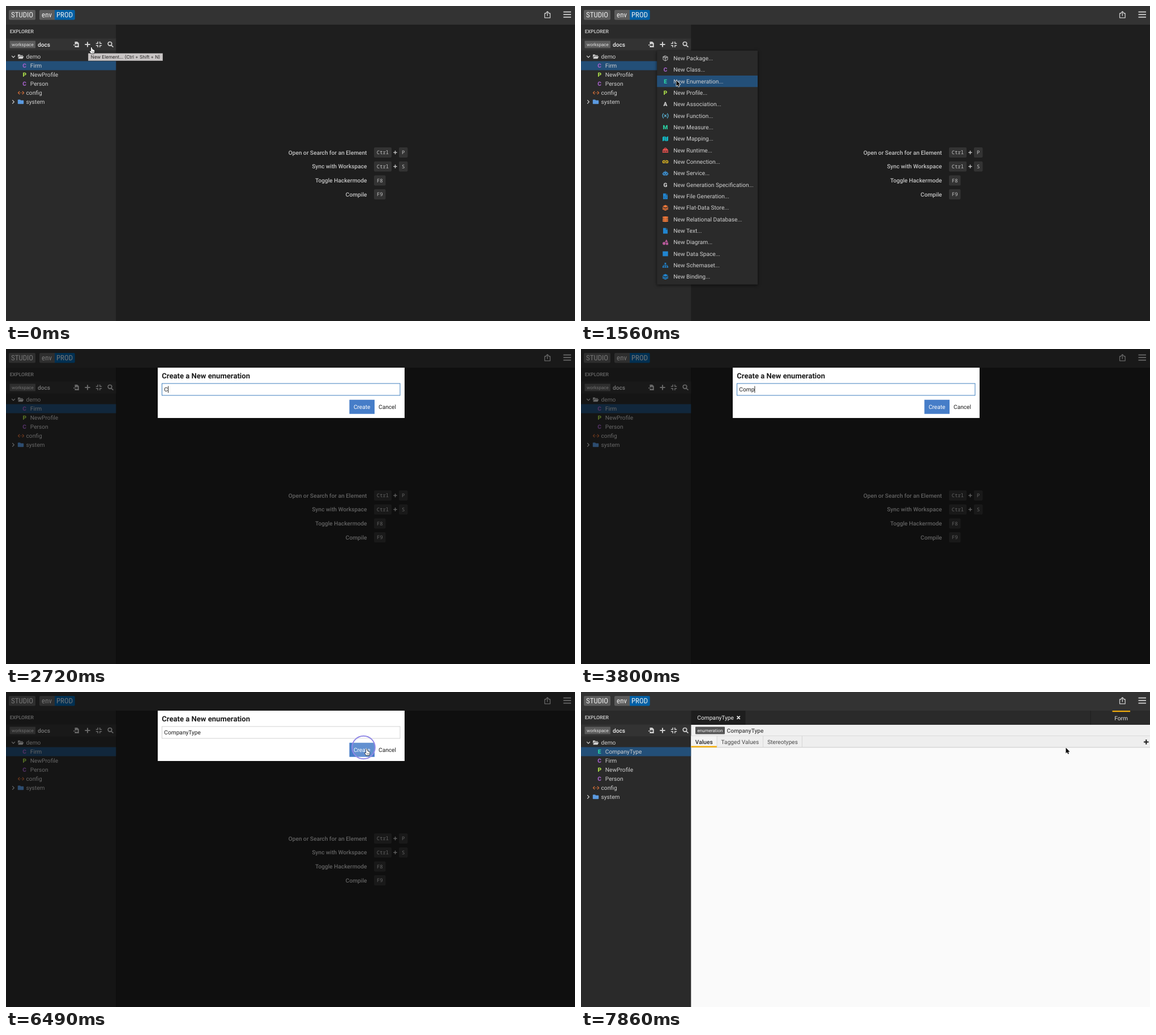
An HTML page with a canvas that plays this animation: 1005 px wide and 557 px high, repeating every 8 s.

```html
<!DOCTYPE html>
<html lang="en">
<head>
<meta charset="utf-8">
<title>Model studio</title>
<style>
html, body { margin: 0; width: 100%; height: 100%; overflow: hidden; background: #1e1e1e; }
canvas { display: block; width: 1005px; height: 557px; }
</style>
</head>
<body>
<canvas id="stage" width="1005" height="557"></canvas>
<script>
const ctx = document.getElementById('stage').getContext('2d');
const LOOP = 8000, STEP = 80;
const SANS = 'Roboto, sans-serif', MONO = '"Roboto Mono", "Noto Sans Mono", monospace';
const BODY = 10.18, SMALL = 8, TITLE = 13.08;
const SIDE = 194.5;
const PURPLE = '#a05fc4', TEAL = '#2bd0a3', LIME = '#aadc4a', RED = '#e8504e', BLUE = '#2185d0';
const ORANGE = '#f0793a', PALE = '#cfcfcf', SELECT = '#234f78', AMBER = '#f3ae0b';

// ---- drawing helpers ----
function rect(x, y, w, h, color, r = 0) {
  ctx.fillStyle = color;
  ctx.beginPath();
  ctx.roundRect(x, y, w, h, r);
  ctx.fill();
}

function circle(x, y, r, color) {
  ctx.fillStyle = color;
  ctx.beginPath();
  ctx.arc(x, y, r, 0, Math.PI * 2);
  ctx.fill();
}

// y is the middle of the capital letters
function text(str, x, y, color, { size = BODY, weight = 400, align = 'left', font = SANS, stretch = 'normal' } = {}) {
  ctx.font = `${weight} ${size}px ${font}`;
  ctx.fontStretch = stretch;
  ctx.textRendering = 'geometricPrecision';
  ctx.textAlign = align;
  ctx.fillStyle = color;
  ctx.fillText(str, x, y + size * 0.356);
}

// SVG path placed at x, y
function shape(d, x, y, { fill, stroke, width = 1.2, scale = 1 }) {
  const path = new Path2D(d);
  ctx.save();
  ctx.translate(x, y);
  ctx.scale(scale, scale);
  ctx.lineJoin = ctx.lineCap = 'round';
  if (stroke) { ctx.strokeStyle = stroke; ctx.lineWidth = width; ctx.stroke(path); }
  if (fill) { ctx.fillStyle = fill; ctx.fill(path); }
  ctx.restore();
}

function plus(x, y, r, w, color) {
  rect(x - r, y - w / 2, 2 * r, w, color);
  rect(x - w / 2, y - r, w, 2 * r, color);
}

// ---- icons, centred on x, y ----
const letter = (ch, color) => (x, y) => text(ch, x, y, color, { weight: 900, align: 'center' });
const line = (d, color, width) => (x, y) => shape(d, x, y, { stroke: color, width });
const solid = (d, color) => (x, y) => shape(d, x, y, { fill: color });
const layers = color => (x, y) => {
  shape('M0-5L5-2.6L0-.2L-5-2.6Z', x, y, { fill: color });
  for (const dy of [0, 2.4]) shape('M-4.6-.2L0 2L4.6-.2', x, y + dy, { stroke: color, width: 1.4 });
};
const file = solid('M-4-5H1V-2H4V5H-4ZM1.8-5L4-2.8H1.8Z', BLUE);
const cube = line('M0-4.4L4-2.3V2.3L0 4.4L-4 2.3V-2.3ZM-4-2.3L0-.2L4-2.3M0-.2V4.4M-2-3.3L2-1.2', PALE, 0.9);

const icons = {
  C: letter('C', PURPLE), E: letter('E', TEAL), P: letter('P', LIME),
  A: letter('A', PALE), M: letter('M', TEAL), G: letter('G', PALE),
  fx: line('M-3.5-4Q-6.5 0-3.5 4M3.5-4Q6.5 0 3.5 4M-1.7-1.8L1.7 1.8M1.7-1.8L-1.7 1.8', '#5bb8dc', 1.2),
  map: solid('M-5-3L-2-4.5V3.2L-5 4.5ZM-1.5-4.5L1.5-3V4.5L-1.5 3.2ZM2-3L5-4.5V3.2L2 4.5Z', '#14b4c0'),
  runtime(x, y) {
    line('M-2-2Q-2-4 0-4T2-2', RED, 1.2)(x, y);
    solid('M-3.5-2.4H3.5L5.2 0V.8H-5.2V0ZM-5.2 1.6H-3V2.4H-1.4V1.6H1.4V2.4H3V1.6H5.2V4.2H-5.2Z', RED)(x, y);
  },
  link: line('M-1-2H-2.6A2 2 0 0 0-2.6 2H-1M1-2H2.6A2 2 0 0 1 2.6 2H1M-2 0H2', '#f0c420', 1.3),
  robot(x, y) {
    rect(x - 3.7, y - 2.5, 7.4, 6.5, '#3f97dc', 1.2);
    rect(x - 5.2, y - 0.6, 1, 3, '#3f97dc');
    rect(x + 4.2, y - 0.6, 1, 3, '#3f97dc');
    rect(x - 0.5, y - 4.5, 1, 2, '#3f97dc');
    for (const dx of [-1.7, 1.7]) circle(x + dx, y + 0.2, 0.9, '#2a2a2a');
    rect(x - 2, y + 2.2, 4, 0.8, '#2a2a2a');
  },
  code(x, y) {
    file(x, y);
    line('M-1.2 0L-2.5 1.4L-1.2 2.8M1.2 0L2.5 1.4L1.2 2.8', '#23435c', 0.8)(x, y);
  },
  flat: layers(ORANGE),
  db(x, y) {
    for (const dy of [-3.2, 0, 3.2]) shape('M-5-1.2Q0-2.4 5-1.2V.6Q0 2.2-5 .6Z', x, y + dy, { fill: ORANGE });
  },
  file,
  diagram(x, y) {
    solid('M1.8-5L4.6-.4H-1Z', '#b95a9c')(x, y);
    circle(x - 2.3, y + 2, 2.6, '#b95a9c');
    rect(x + 1, y + 0.6, 4, 4, '#b95a9c');
  },
  square(x, y) { rect(x - 4.7, y - 4.3, 9.4, 8.6, BLUE); },
  tree(x, y) {
    line('M0-3V0M-3.7 2.5V0H3.7V2.5M0 0V2.5', BLUE, 0.9)(x, y);
    for (const [dx, dy] of [[0, -3.2], [-3.7, 3], [0, 3], [3.7, 3]]) rect(x + dx - 1.4, y + dy - 1.2, 2.8, 2.4, BLUE);
  },
  bind: layers(BLUE),
  cube,
  config(x, y) {
    line('M-2.6-2.4L-5 0L-2.6 2.4M2.6-2.4L5 0L2.6 2.4', '#e0743a', 1.2)(x, y);
    for (const dx of [-1.6, 0, 1.6]) circle(x + dx, y, 0.55, '#e0743a');
  },
  open: solid('M-5-3.8H-1.5L-.4-2.6H3.8V-1.2H-3.2L-5 2.6ZM-2.7-.4H5.4L3.4 3.8H-4.7Z', PALE),
  folder: solid('M-4.4-4H-1L.2-2.8H4.4Q5.2-2.8 5.2-2V3Q5.2 3.8 4.4 3.8H-4.4Q-5.2 3.8-5.2 3V-3.2Q-5.2-4-4.4-4Z', '#5b9ae0')
};

// ---- application ----
function topBar() {
  rect(0, 0, 1005, 33, '#333');
  const label = { size: 12.92, font: '"Roboto Condensed", Roboto, sans-serif', stretch: 'condensed', align: 'center' };
  rect(5, 7, 47, 17.5, '#5c5c5c', 2);
  text('STUDIO', 28.5, 15.8, '#f0f0f0', label);
  rect(59, 7, 27.5, 17.5, '#5c5c5c', [2, 0, 0, 2]);
  text('env', 72, 15.8, '#f0f0f0', label);
  rect(86, 7, 35.7, 17.5, '#0060a6', [0, 2, 2, 0]);
  text('PROD', 103.5, 15.8, '#f0f0f0', label);
  shape('M-2.6-2H-4.8V5.8H4.8V-2H2.6M0 2.3V-5.2M-2.5-2.9L0-5.4L2.5-2.9', 956.3, 15, { stroke: PALE, width: 1.3 });
  for (const y of [9.6, 14.2, 18.8]) rect(984.5, y, 13.5, 1.8, PALE);
}

function sidebar(created) {
  rect(0, 33, SIDE, 524, '#2a2a2a');
  text('EXPLORER', 6.7, 45, '#d2d2d2', { size: 8.7, weight: 500 });
  rect(0, 57.5, SIDE, 21, '#333');
  rect(6.5, 61.5, 45.5, 13, '#5c5c5c', 1);
  text('workspace', 29.3, 68, '#dedede', { size: SMALL, align: 'center' });
  text('docs', 55.9, 68, '#f0f0f0', { weight: 500 });

  shape('M-2.5-5H2L4.8-2.2V5H-2.5V2H.6V3.6L3.4 1L.6-1.8V-.1H-2.5ZM-5 .2H-2.5V1.7H-5Z', 124, 68, { fill: PALE });
  plus(144, 68, 4.6, 2, PALE);
  shape('M-4.6-1.8H-1.8V-4.6M4.6-1.8H1.8V-4.6M-4.6 1.8H-1.8V4.6M4.6 1.8H1.8V4.6', 164, 68, { stroke: PALE, width: 1.5 });
  shape('M2.3-1A3.3 3.3 0 1 1-4.3-1A3.3 3.3 0 1 1 2.3-1M1.5 1.7L4.4 4.4', 184.5, 67.8, { stroke: PALE, width: 1.7 });

  rect(0, 97.5, SIDE, 16, SELECT);
  const items = [['C', 'Firm'], ['P', 'NewProfile'], ['C', 'Person']];
  if (created) items.unshift(['E', 'CompanyType']);
  const arrow = { stroke: PALE, width: 1.2 };
  shape('M-2.6-1.3L0 1.3L2.6-1.3', 13, 89.7, arrow);
  icons.open(26, 89.5);
  text('demo', 35.5, 89.5, PALE);
  let y = 105.5;
  for (const [kind, name] of items) {
    icons[kind](32.7, y);
    text(name, 42.8, y, PALE);
    y += 16;
  }
  icons.config(26.5, y);
  text('config', 35.5, y, PALE);
  y += 16;
  shape('M-1.3-2.8L1.5 0L-1.3 2.8', 12.8, y, arrow);
  icons.folder(26, y);
  text('system', 35.5, y, PALE);
}

function shortcuts() {
  rect(SIDE, 33, 1005 - SIDE, 524, '#1e1e1e');
  const rows = [['Open or Search for an Element', 'Ctrl', 'P'], ['Sync with Workspace', 'Ctrl', 'S'],
    ['Toggle Hackermode', 'F8'], ['Compile', 'F9']];
  const key = (str, x, y, w) => {
    rect(x, y - 9, w, 18, '#333', 2);
    text(str, x + w / 2, y, '#c4c4c4', { size: 8.9, align: 'center', font: MONO });
  };
  rows.forEach(([name, first, second], i) => {
    const y = 259 + i * 24.7;
    text(name, 637.5, y, '#c4c4c4', { weight: 500, align: 'right' });
    key(first, 650, y, second ? 31 : 20.5);
    if (!second) return;
    plus(687.5, y, 3.2, 1.4, '#c4c4c4');
    key(second, 694, y, 15.5);
  });
}

function editor() {
  const width = 1005 - SIDE;
  rect(SIDE, 33, width, 25, '#2a2a2a');
  rect(SIDE, 33, 96, 25, '#1e1e1e');
  text('CompanyType', 205.3, 45, '#f0f0f0');
  shape('M-2.1-2.1L2.1 2.1M2.1-2.1L-2.1 2.1', 278.2, 45.2, { stroke: '#f0f0f0', width: 1.8 });
  rect(899.5, 33, 1, 25, '#1e1e1e');
  rect(938.5, 33, 31.5, 2.2, AMBER);
  text('Form', 954, 46, '#e0e0e0', { align: 'center' });

  rect(SIDE, 58, width, 20, '#f0f0f0');
  rect(202, 61.5, 52, 13, '#545454', 1);
  text('enumeration', 228, 68, '#f0f0f0', { size: SMALL, align: 'center' });
  text('CompanyType', 257.5, 68, '#4a4a4a', { weight: 500 });

  rect(SIDE, 77.5, width, 21, '#eee');
  rect(SIDE, 77.2, width, 0.8, '#d4d4d4');
  rect(SIDE, 78, 45.5, 20, '#f3f3f3');
  rect(SIDE, 97.6, width, 0.9, '#c4c4c4');
  rect(SIDE, 95.4, 45.5, 2.6, AMBER);
  for (const x of [239.7, 321.3, 390.2]) rect(x, 78, 0.8, 19.6, '#d0d0d0');
  text('Values', 201.8, 88, '#252525', { weight: 500 });
  text('Tagged Values', 247.6, 88, '#4a4a4a');
  text('Stereotypes', 329.2, 88, '#4a4a4a');
  plus(998.3, 88.4, 4.3, 2, '#1a1a1a');
  rect(SIDE, 98.5, width, 458.5, '#fafafa');
}

function tooltip() {
  rect(145, 83.5, 132, 13.5, '#8a8787');
  rect(145.5, 84, 131, 12.5, '#c9c5c5');
  text('New Element... (Ctrl + Shift + N)', 149.8, 90.3, '#262424', { size: 8.1, font: 'Inter, sans-serif' });
}

const menuItems = [['cube', 'Package'], ['C', 'Class'], ['E', 'Enumeration'], ['P', 'Profile'], ['A', 'Association'],
  ['fx', 'Function'], ['M', 'Measure'], ['map', 'Mapping'], ['runtime', 'Runtime'], ['link', 'Connection'],
  ['robot', 'Service'], ['G', 'Generation Specification'], ['code', 'File Generation'], ['flat', 'Flat-Data Store'],
  ['db', 'Relational Database'], ['file', 'Text'], ['diagram', 'Diagram'], ['square', 'Data Space'],
  ['tree', 'Schemaset'], ['bind', 'Binding']];

function menu(mouseY) {
  const row = 20.33;
  ctx.save();
  ctx.shadowColor = 'rgba(0,0,0,.6)';
  ctx.shadowBlur = 5;
  ctx.shadowOffsetY = 1;
  rect(134.3, 79, 177.7, 413.5, '#2a2a2a');
  ctx.restore();
  menuItems.forEach(([kind, name], i) => {
    const y = 92.5 + i * row;
    if (Math.floor((mouseY - 82.4) / row) === i) rect(134.3, y - row / 2, 177.7, row, SELECT);
    icons[kind](149, y);
    text(`New ${name}...`, 163.3, y, PALE);
  });
}

function dialog(value, caret, focused) {
  rect(0, 0, 1005, 557, 'rgba(0,0,0,.5)');
  rect(268, 33, 436, 89, '#fff');
  text('Create a New enumeration', 275.2, 47, '#1c1c1c', { size: TITLE, weight: 700 });
  ctx.strokeStyle = focused ? '#3f7fbd' : '#d2d2d2';
  ctx.lineWidth = 1;
  ctx.strokeRect(275.5, 61, 420.5, 21);
  if (value) text(value, 279.3, 71.7, '#1c1c1c');
  else text('Enter a name, use :: to create new package(s) for the enumeration', 279.3, 71.7, '#737373');
  if (caret) {
    ctx.font = `400 ${BODY}px ${SANS}`;
    rect(279.4 + ctx.measureText(value).width, 65.5, 0.9, 12, '#111');
  }
  rect(606.5, 89.7, 44.5, 25, value ? '#467dc8' : '#ededed');
  text('Create', 628.7, 102, value ? '#fff' : '#555', { align: 'center' });
  text('Cancel', 673.5, 102, '#1c1c1c', { align: 'center' });
}

// ---- pointer ----
function pointer({ x, y, hand }) {
  if (hand) {
    shape('M-.9 0Q0-1 .9 0V3.6Q2-.1 2.3 3.8Q3.6 3 3.9 4.4Q5.4 4 5.3 5.6Q5.4 8.5 4.2 10.6H-.6Q-1.8 8.6-3.2 6.9Q-3.2 5.6-1.7 6.2L-.9 6.9Z',
      x, y, { fill: '#fff', stroke: '#111', width: 1.2 });
    shape('M.8 7V9M2.2 7V9M3.6 7V9', x, y, { stroke: '#333', width: 0.5 });
  } else {
    shape('M0 0V10L2.3 7.9L3.8 11.4L5.5 10.7L4 7.3H7.1Z', x + 0.4, y + 0.6,
      { fill: '#0a0a0a', stroke: '#f6f6f6', width: 1.5, scale: 0.98 });
  }
}

function ring(t) {
  if (t < 6490 || t >= 7130) return;
  const r = t < 6570 ? 20.3 : 23;
  ctx.save();
  if (t >= 6730) ctx.globalAlpha = 1 - (Math.floor((t - 6730) / STEP) + 1) / 6;
  circle(631.5, 98, r, 'rgba(255,255,255,.15)');
  ctx.lineWidth = 2;
  ctx.strokeStyle = '#9188e6';
  ctx.beginPath();
  ctx.arc(631.5, 98, r, 0, Math.PI * 2);
  ctx.stroke();
  ctx.restore();
}

// share of a stepped move finished at time t
function progress(t, start, steps, first = 1) {
  const n = Math.floor((t - start) / STEP) + first;
  return Math.max(0, Math.min(1, n / (steps - 1 + first)));
}
const smooth = p => p * p * (3 - 2 * p);
const easeOut = p => 1 - (1 - p) ** 2.2;
const mix = (a, b, p) => a + (b - a) * p;

function pointerAt(t) {
  if (t < 500) return { x: 151, y: 73.5, hand: true };
  if (t < 2720) {
    const p = smooth(progress(t, 1080, 7));
    return { x: mix(150.5, 168, p), y: mix(71, 131, p) };
  }
  if (t < 5530) return null;
  if (t < 5930) {
    const p = smooth(progress(t, 5530, 4, 0.3));
    return { x: mix(168, 444, p), y: mix(132, 107, p) };
  }
  if (t < 6570) {
    const p = easeOut(progress(t, 5930, 6));
    const x = mix(444, 637, p);
    return { x, y: mix(107, 101.5, p), hand: x > 606 };
  }
  return { x: mix(633, 856, smooth(progress(t, 7780, 2))), y: 98 };
}

const NAME = 'CompanyType';
const keyTimes = [2640, 3220, 3470, 3800, 3880, 3960, 4210, 4710, 4870, 5120, 5280];

function draw(t) {
  const created = t >= 6570, mouse = pointerAt(t);
  topBar();
  sidebar(created);
  if (created) editor();
  else shortcuts();
  if (t < 500) tooltip();
  else if (t < 1810) menu(mouse.y);
  else if (!created) {
    const value = NAME.slice(0, keyTimes.filter(k => k <= t).length);
    const focused = t < 6490;
    const blinkOff = (t >= 2310 && t < 2640) || (t >= 5770 && t < 6330);
    dialog(value, focused && !blinkOff, focused);
  }
  ring(t);
  if (mouse) pointer(mouse);
}

const begin = performance.now();
function tick() {
  draw((performance.now() - begin) % LOOP);
  requestAnimationFrame(tick);
}
tick();
</script>
</body>
</html>
```
